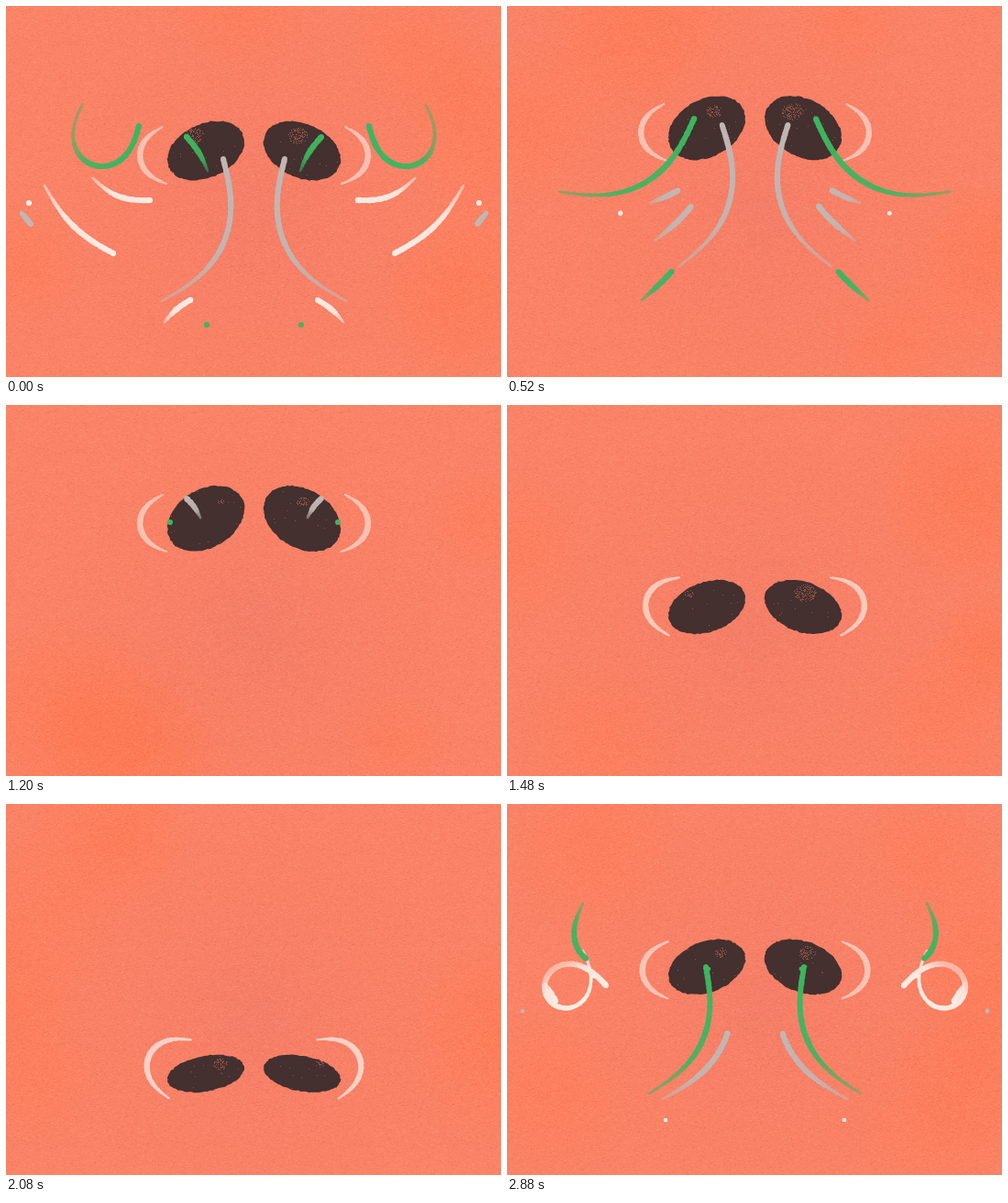
Animation of 540 by 405 pixels, one loop 2.92 s. Source, as an HTML page with a canvas:

```html
<!DOCTYPE html>
<html>
<head>
<meta charset="utf-8">
<style>
  html, body { margin: 0; width: 100%; height: 100%; overflow: hidden; background: #fa8064; }
  canvas { display: block; }
</style>
</head>
<body>
<canvas id="stage" width="540" height="405"></canvas>
<script>
const ctx = document.getElementById('stage').getContext('2d');
const W = 540, H = 405, AXIS = 541, STEP = 40, FRAMES = 73;
const WHITE = '248,236,228', GRAY = '194,182,179', GREEN = '62,181,95';
const SPEED = 85, NOSE_X = 218, NOSE_RX = 42;

const linear = u => u, easeIn = u => u * u, smooth = u => u * u * (3 - 2 * u);

// Nose: frame, centre y, height, wing hook, easing to the next key
const NOSE = [
  [0, 158, 65, 0, linear],
  [8, 139, 70, 0, linear],
  [19, 126, 70, 0, linear],
  [30, 124, 72, 0, smooth],
  [43, 297, 49, 1, linear],
  [60, 292, 34, 1, easeIn],
  [FRAMES, 158, 65, 0]
];

function noseAt(n) {
  const i = NOSE.findIndex(k => k[0] > n) - 1;
  const a = NOSE[i], b = NOSE[i + 1];
  const u = a[4]((n - a[0]) / (b[0] - a[0]));
  const [cy, h, hook] = [1, 2, 3].map(k => a[k] + (b[k] - a[k]) * u);
  return { cy, h, hook };
}

function random(seed) {
  let s = (seed * 7919 + 12345) >>> 0;
  return () => {
    s = (s + 0x6D2B79F5) >>> 0;
    let t = Math.imul(s ^ (s >>> 15), 1 | s);
    t ^= t + Math.imul(t ^ (t >>> 7), 61 | t);
    return ((t ^ (t >>> 14)) >>> 0) / 4294967296;
  };
}

// Points 1px apart from (x0,y0) to (x1,y1) while the heading turns by `turn` degrees;
// the turn gathers in the middle, so a large one makes a curl
function curve(x0, y0, x1, y1, turn, steps) {
  const n = steps || 60, raw = [[0, 0]];
  let x = 0, y = 0;
  for (let i = 0; i < n; i++) {
    const a = turn * Math.PI / 180 * smooth((i + .5) / n);
    raw.push([x += Math.cos(a), y += Math.sin(a)]);
  }
  const dx = x1 - x0, dy = y1 - y0, m = x * x + y * y;
  const c = (dx * x + dy * y) / m, s = (dy * x - dx * y) / m;
  if (!steps) return curve(x0, y0, x1, y1, turn, Math.max(1, Math.round(n * Math.hypot(c, s))));
  return raw.map(([px, py]) => [x0 + px * c - py * s, y0 + px * s + py * c]);
}

// A scent is fully drawn at `frame`, then flies on into the nostril
const scents = [];
function scent(color, frame, x0, y0, x1 = x0, y1 = y0, turn = 0) {
  const path = curve(x0, y0, x1, y1, turn), drawn = path.length - 1;
  const { cy } = noseAt(frame % FRAMES);
  const curl = Math.abs(turn) > 300;
  if (!curl && Math.hypot(NOSE_X - x1, cy - y1) > 45) path.push(...curve(x1, y1, NOSE_X, cy, -40));
  scents.push({ color, frame, path, drawn });
}

scent(GRAY, 60, 64, 141);
scent(WHITE, 60, 37, 325, 88, 318, -60);
scent(GREEN, 60, 75, 343, 83, 343);
scent(GRAY, 60, 135, 343);

scent(WHITE, 72, 83, 160, 108, 198, 340);
scent(GREEN, 72, 155, 316, 217, 178, -68);
scent(GREEN, 73, 83, 108, 145, 131, -190);
scent(WHITE, 73, 95, 188, 157, 212, -45);
scent(WHITE, 73, 42, 196, 117, 270, -32);
scent(GRAY, 73, 170, 322, 237, 167, -75);
scent(GREEN, 73, 220, 180, 197, 143, -20);
scent(WHITE, 73, 173, 345, 201, 321, 20);
scent(GRAY, 73, 17, 226, 27, 238);
scent(WHITE, 73, 25, 215);
scent(GREEN, 73, 219, 348);

scent(WHITE, 81, 214, 248, 209, 142, -45);
scent(WHITE, 81, 217, 300, 245, 157, -55);
scent(GREEN, 81, 192, 188, 184, 134, -90);
scent(GREEN, 81, 59, 142, 63, 162);
scent(WHITE, 81, 23, 220, 125, 243, -85);
scent(GRAY, 81, 38, 250, 163, 294, -50);
scent(GREEN, 81, 226, 343, 243, 308);

scent(GRAY, 92, 40, 330, 92, 312, -343);
scent(GREEN, 92, 112, 242, 200, 184, -125);
scent(WHITE, 92, 203, 137, 191, 112, -20);
scent(GRAY, 92, 212, 112, 204, 100);
scent(GREEN, 92, 255, 125, 243, 93);
scent(GRAY, 103, 212, 123, 197, 102, -20);
scent(GREEN, 103, 179, 128);

// Seeded scents fill the time between the ones above
const composed = [...new Set(scents.map(s => s.frame))];
for (let f = 65; f < 102; f++) {
  if (composed.some(k => f >= k - 1 && f <= k + 4)) continue;
  for (let k = 0; k < 2; k++) {
    const r = random(f * 2 + k);
    scent([WHITE, GRAY, GREEN][Math.floor(r() * 3)], f, 40 + r() * 170, 200 + r() * 130,
      195 + r() * 45, noseAt(f % FRAMES).cy - 10 + r() * 20, -40 - r() * 60);
  }
}

const grain = document.createElement('canvas');
grain.width = grain.height = 160;
{
  const g = grain.getContext('2d'), r = random(5);
  for (let i = 0; i < 9000; i++) {
    g.fillStyle = r() < .5 ? 'rgba(255,205,180,.08)' : 'rgba(200,60,40,.06)';
    g.fillRect(Math.floor(r() * 160), Math.floor(r() * 160), 1 + Math.floor(r() * 2), 1);
  }
}

function glow(x, y, r, rgb, alpha) {
  const g = ctx.createRadialGradient(x, y, 0, x, y, r);
  g.addColorStop(0, `rgba(${rgb},${alpha})`);
  g.addColorStop(1, `rgba(${rgb},0)`);
  ctx.fillStyle = g;
  ctx.fillRect(0, 0, W, H);
}

function paper(rnd) {
  ctx.fillStyle = '#fb8366';
  ctx.fillRect(0, 0, W, H);
  glow(265 + rnd() * 20, 210 + rnd() * 40, 220, '238,120,104', .45);
  for (let i = 0; i < 7; i++) {
    const a = rnd() * 6.28;
    glow(270 + 270 * Math.cos(a), 202 + 200 * Math.sin(a), 60 + rnd() * 70, '255,119,78', .35);
  }
  const ox = -Math.floor(rnd() * 160), oy = -Math.floor(rnd() * 160);
  for (let x = ox; x < W; x += 160)
    for (let y = oy; y < H; y += 160) ctx.drawImage(grain, x, y);
}

// Union of dots gives a tapered stroke in one fill
function brush(points, radius, fill, rnd) {
  ctx.beginPath();
  points.forEach(([x, y], i) => {
    const r = radius(i / Math.max(1, points.length - 1)) + (rnd() - .5) * .5;
    ctx.moveTo(x + r, y);
    ctx.arc(x, y, r, 0, 7);
  });
  ctx.fillStyle = fill;
  ctx.fill();
}

function specks(count, cx, cy, rx, ry, rnd) {
  for (let i = 0; i < count; i++) {
    const a = rnd() * 6.28, d = Math.sqrt(rnd());
    ctx.fillRect(Math.floor(cx + rx * d * Math.cos(a)), Math.floor(cy + ry * d * Math.sin(a)), 1, 1);
  }
}

function nostril({ cy, h }, rnd) {
  ctx.save();
  ctx.beginPath();
  for (let a = 0; a < 6.28; a += .07) {
    ctx.lineTo(NOSE_X + NOSE_RX * Math.cos(a) + (rnd() - .5) * 1.2,
      cy + h / 2 * (.95 * Math.sin(a) - .3 * Math.cos(a)) + (rnd() - .5) * 1.2);
  }
  ctx.closePath();
  ctx.fillStyle = '#43302f';
  ctx.fill();
  ctx.clip();
  ctx.fillStyle = '#8a5145';
  specks(14, NOSE_X, cy, NOSE_RX, h / 2, rnd);
  const r = 4 + rnd() * 9;
  specks(r * r, NOSE_X - 32 + rnd() * 50, cy - h * .25, r, r * .8, rnd);
  ctx.restore();
}

function wing({ cy, hook }, rnd) {
  const arc = curve(171 + 31 * hook, cy - 26 - 11 * hook, 175 + 3 * hook, cy + 36 - 9 * hook, -130 - 20 * hook);
  brush(arc, f => 1 + 2.2 * Math.sin(Math.PI * f), `rgba(${WHITE},${.6 + .15 * hook})`, rnd);
}

function drawScent({ color, frame, path, drawn }, m, rnd) {
  const age = m - frame, head = drawn + SPEED * age, last = path.length - 1;
  if (head < -80) return;   // waits as a dot just before it leaves
  const tail = Math.max(0, Math.min(age * Math.max(140, drawn), head - 40));
  if (age > 0 && tail >= last) return;
  const part = path.slice(Math.floor(tail), Math.max(0, Math.floor(Math.min(head, last))) + 1);
  const long = part.length > 20;
  let fill = `rgb(${color})`;
  if (long) {
    fill = ctx.createLinearGradient(...part[0], ...part[part.length - 1]);
    fill.addColorStop(0, `rgba(${color},.5)`);
    fill.addColorStop(.35, `rgba(${color},.92)`);
    fill.addColorStop(1, `rgb(${color})`);
  }
  const thin = long ? 1.4 : 2.4;
  brush(part, f => thin + (3 - thin) * Math.min(1, f * 2), fill, rnd);
}

function draw(n) {
  const rnd = random(n + 1), nose = noseAt(n);
  const m = n < 50 ? n + FRAMES : n;   // the inhale spans the loop point
  paper(rnd);
  for (const flip of [false, true]) {
    ctx.save();
    if (flip) ctx.transform(-1, 0, 0, 1, AXIS, 0);
    nostril(nose, rnd);
    wing(nose, rnd);
    scents.forEach(s => drawScent(s, m, rnd));
    ctx.restore();
  }
}

let start, shown = -1;
function tick(now) {
  start ??= now;
  const n = Math.floor((now - start) / STEP) % FRAMES;
  if (n !== shown) draw(shown = n);
  requestAnimationFrame(tick);
}
requestAnimationFrame(tick);
</script>
</body>
</html>
```
